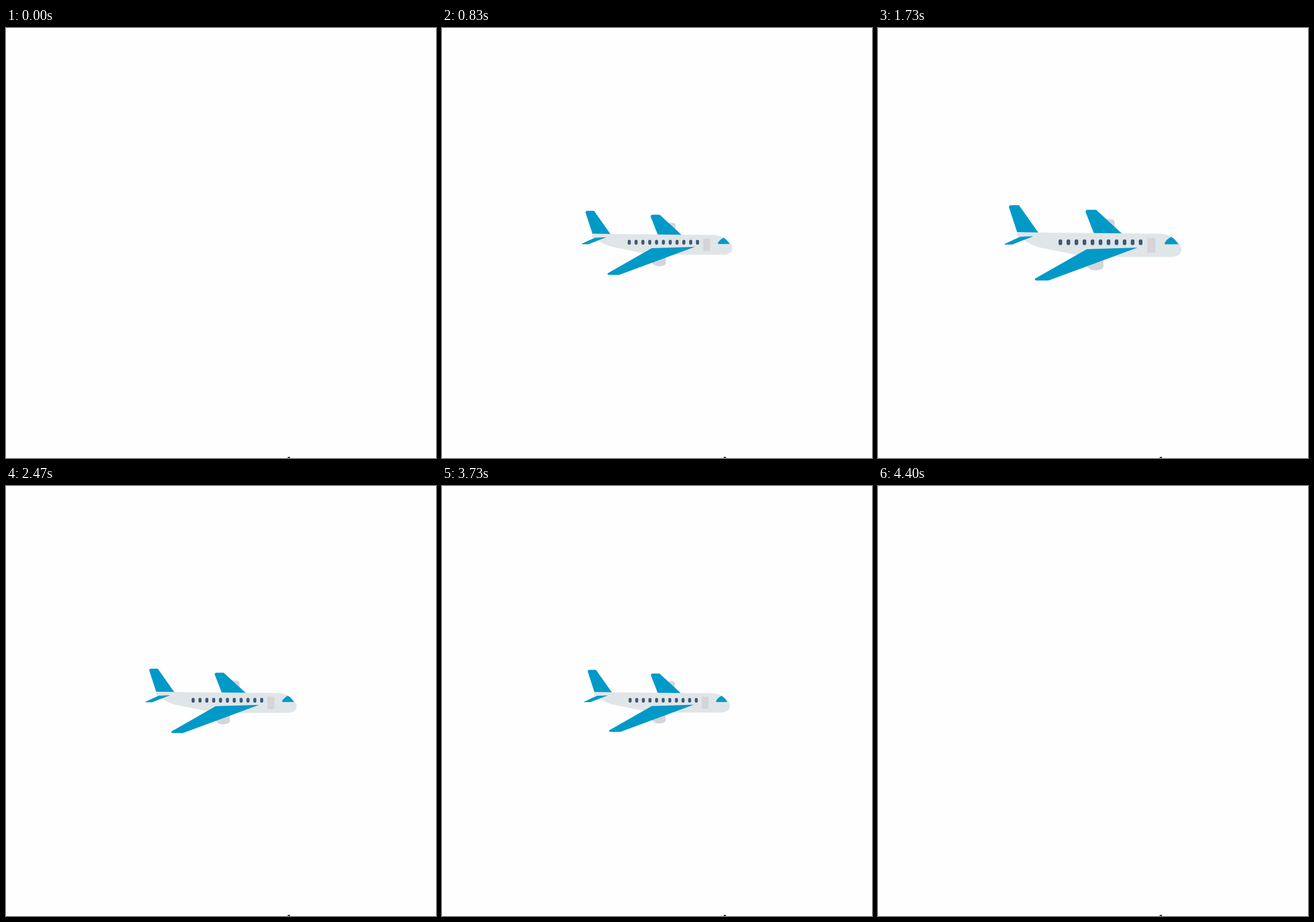
These frames come from a looping animation (748x748 px, 5.01 s). An HTML page:

```html
<!DOCTYPE html>
<html lang="en">
<head>
<meta charset="utf-8">
<title>Plane</title>
<style>
  html, body { margin: 0; width: 100%; height: 100%; overflow: hidden; background: #fefefe; }
  svg { display: block; width: 100vw; height: 100vh; }
  .blue { fill: #0199c8; }
  .body { fill: #e0e5e8; }
  .gray { fill: #d4d4da; }
  .pane { fill: #3d5a78; }
</style>
</head>
<body>
<svg viewBox="0 0 748 748">
  <rect x="490" y="746" width="4" height="2" fill="#333"/>
  <g id="plane" visibility="hidden">
    <path class="gray" d="M396 328H409Q416 329 416 334V345H404Z"/>
    <path class="blue" d="M376 356L360 315Q359 310 364 310H380L430 356Z"/>
    <path class="blue" d="M228 355L212 306Q211 301 216 301H231L269 355Z"/>
    <path class="body" d="M227 353L290 354L378 355L500 356C512 356 520 359 526 362C536 367 545 378 545 386C545 396 536 401 524 401H362L268 382Q248 375 238 366L227 361Z"/>
    <path class="blue" d="M203 376L233 362L259 361L218 377H204Z"/>
    <path class="gray" d="M362 416L394 404V421Q393 426 378 427Q366 426 362 418Z"/>
    <path class="blue" d="M262 443L362 386L460 383L288 446.5H264Q261 446 262 443Z"/>
    <rect class="gray" x="479" y="364.5" width="15.5" height="28" rx="1"/>
    <path class="blue" d="M514 376.5Q511 376 513 373Q517 366 525 362Q533 367 539 376.5Z"/>
    <g id="panes" class="pane"></g>
  </g>
</svg>
<script>
const LOOP = 5010, FRAME = 1000 / 30, BEAT = 4000 / 3;
const FIRST = 4, LAST = 131;      // visible frames
const CX = 374, CY = 373.5, FULL = 342;
const plane = document.getElementById('plane');

document.getElementById('panes').innerHTML = Array.from({ length: 11 }, (_, i) =>
  `<rect x="${307.5 + 15.5 * i}" y="367" width="7" height="11" rx="3.2"/>`).join('');

// plane width over one beat: [ms, px]
const pulse = [[0, 342], [167, 314], [200, 308], [433, 278], [633, 262], [800, 251],
  [867, 254], [933, 263], [1233, 324], [BEAT, 342]];

function lerpKeys(keys, t) {
  const i = Math.max(1, keys.findIndex(k => k[0] >= t));
  const [t0, a] = keys[i - 1], [t1, b] = keys[i];
  return a + (b - a) * (t - t0) / (t1 - t0);
}

function width(t) {
  if (t < 200) return FULL + (200 - t) * 0.05;
  if (t > 4199) return FULL + (t - 4199) * 0.03;
  return lerpKeys(pulse, (t - 200) % BEAT);
}

function shift(t) {
  const before = Math.max(0, 420 - t) / 287;
  const after = Math.max(0, t - 4080) / 287;
  return 310 * after ** 2 - 494 * before ** 2;
}

function draw(now) {
  const frame = Math.floor((now % LOOP + 5) / FRAME);
  const shown = frame >= FIRST && frame <= LAST;
  plane.setAttribute('visibility', shown ? 'visible' : 'hidden');
  if (shown) {
    const t = frame * FRAME, x = shift(t);
    plane.setAttribute('transform',
      `translate(${CX + x} ${CY + x * 0.06}) scale(${width(t) / FULL}) translate(${-CX} ${-CY})`);
  }
}

let start;
function tick(now) {
  start ??= now;
  draw(now - start);
  requestAnimationFrame(tick);
}
requestAnimationFrame(tick);
</script>
</body>
</html>
```
